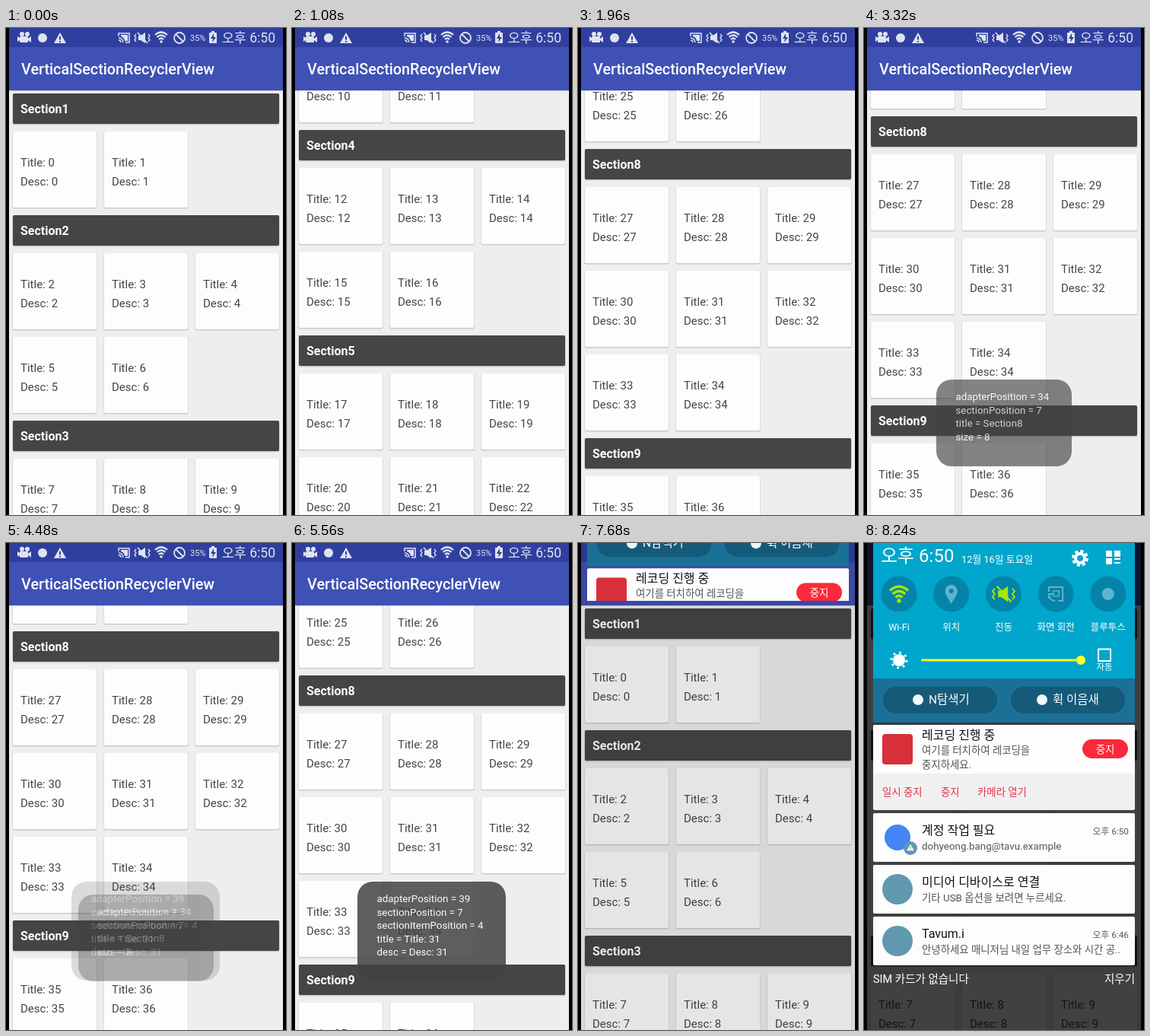
Animation of 368x640 px, one loop 8640 ms. Source, as an HTML page:

```html
<!DOCTYPE html>
<html lang="ko">
<head>
<meta charset="utf-8">
<title>VerticalSectionRecyclerView</title>
<style>
  html, body { margin: 0; height: 100%; overflow: hidden; background: #000; }
  svg { display: block; width: 100vw; height: 100vh; }
  text { font-family: Roboto, "Noto Sans CJK KR", "Noto Sans CJK", sans-serif; white-space: pre; }
</style>
</head>
<body>
<svg id="stage" viewBox="0 0 368 640"></svg>
<script>
const LOOP = 8640, STEP = 40;
const PAGE = '#eeeef0', DARK = '#454545', WHITE = '#fdfdfd', PALE = '#dfe3f0';
const STATUS = '#303f9f', PRIMARY = '#3f51b5';

const rect = (x, y, w, h, fill, r = 0) =>
  `<rect x="${x}" y="${y}" width="${w}" height="${h}" rx="${r}" fill="${fill}"/>`;
const disc = (x, y, r, fill) => `<circle cx="${x}" cy="${y}" r="${r}" fill="${fill}"/>`;
const ring = (x, y, r, color, width, dash = 'none') =>
  `<circle cx="${x}" cy="${y}" r="${r}" fill="none" stroke="${color}" stroke-width="${width}" stroke-dasharray="${dash}"/>`;
const line = (d, color, width = 1.5) =>
  `<path d="${d}" fill="none" stroke="${color}" stroke-width="${width}"/>`;
const shape = (d, fill) => `<path d="${d}" fill="${fill}" fill-rule="evenodd"/>`;
const text = (x, y, s, size, fill, anchor = 'start', weight = 400) =>
  `<text x="${x}" y="${y}" font-size="${size}" fill="${fill}" text-anchor="${anchor}" font-weight="${weight}">${s}</text>`;
const at = (x, y, body, scale = 1) => `<g transform="translate(${x} ${y}) scale(${scale})">${body}</g>`;
const group = (id, body) => `<g id="${id}">${body}</g>`;

// Icons are centred on 0,0
const wifi = c => line('M-8-3Q0-10 8-3M-5.5 0Q0-5 5.5 0M-3 3Q0 0 3 3', c, 2.2) + disc(0, 6, 1.8, c);
const vibrate = c => shape('M-5-3H-2L4-7V7L-2 3H-5Z', c) + line('M-6-7L7 7', c, 1.5) +
  line('M-8-5l-2 2.5 2 2.5-2 2.5 2 2.5M8-5l2 2.5-2 2.5 2 2.5-2 2.5', c, 1.3);
const warning = c => shape('M0-7L8 7H-8ZM-1-2V2.5H1V-2ZM-1 4V5.7H1V4Z', c);
const cast = c => line('M-7-2V-6H7V6H2M-7 0a6 6 0 0 1 6 6M-7 3a3 3 0 0 1 3 3', c) +
  shape('M-4-4H5V4H1Q0-1-4-2Z', c);
const camera = c => disc(-3, -4, 3, c) + disc(4, -4, 3, c) + rect(-6, -1, 11, 8, c, 1) +
  shape('M5 2L9-1V7L5 4ZM-9-1L-6 1V4L-9 6Z', c);

function card(x, y, w, h, fill) {
  return rect(x - .5, y, w + 1, h + 1.5, 'rgba(60,60,80,.2)', 2) + rect(x, y, w, h, fill, 2);
}

function listBody() {
  let y = 86, item = 0, out = '';
  [2, 5, 5, 5, 6, 2, 2, 8, 2, 5].forEach((size, i) => {
    out += card(9, y, 350, 40, DARK) + text(19, y + 26, 'Section' + (i + 1), 16, '#fff', 'start', 700);
    y += 50;
    for (let k = 0; k < size; k++, item++) {
      const x = 9 + k % 3 * 120, top = y + Math.floor(k / 3) * 110;
      out += card(x, top, 110, 100, WHITE) +
        text(x + 10, top + 46, 'Title: ' + item, 15, DARK) +
        text(x + 10, top + 71, 'Desc: ' + item, 15, DARK);
    }
    y += Math.ceil(size / 3) * 110;
  });
  return out;
}

function statusBar() {
  return rect(4, 0, 360, 25, STATUS) +
    at(24, 12, camera(PALE)) + disc(48, 13, 6, PALE) + at(71, 13, warning(PALE)) +
    at(155, 13, cast(PALE)) + at(179, 13, vibrate(PALE)) + at(204, 12, wifi(PALE)) +
    ring(228, 13, 7, PALE, 1.8) + line('M223 8L233 18', PALE, 1.8) + text(242, 17, '35%', 11, PALE) +
    rect(270, 4, 4, 3, PALE) + rect(267, 6, 10, 14, PALE, 1) + shape('M273 7L269 14H272L271 19L276 12H273Z', STATUS) +
    text(354, 19, '오후 6:50', 17.5, PALE, 'end');
}

function toast(x, y, w, h, lines) {
  return rect(x, y, w, h, 'rgba(66,66,66,.85)', 20) +
    lines.map((s, i) => text(x + 25.5, y + 27 + i * 17.5, s, 13.3, '#fafafa')).join('');
}

function quickSettings() {
  const on = '#a6e800', off = '#5fb4cc', yellow = '#ffff20';
  const toggles = [
    ['Wi-Fi', at(0, 0, wifi(on), 1.5)],
    ['위치', shape('M0 13C-5 4-8 1-8-4A8 8 0 0 1 8-4C8 1 5 4 0 13ZM-3-4a3 3 0 0 0 6 0a3 3 0 0 0-6 0Z', off)],
    ['진동', at(0, 0, vibrate(on), 1.45)],
    ['화면 회전', line('M-9-3V-9H9V9H3M-9 1a8 8 0 0 0 8 8M-9 6V0H-3', off, 2) + line('M-3-4H4V3H-3Z', off)],
    ['블루투스', disc(0, 0, 8, off)]
  ];
  return rect(12, 0, 344, 178, '#00a6cb') + rect(12, 178, 344, 58, '#1b7096') +
    text(22, 25, '오후 6:50', 24, '#fff') + text(128, 26, '12월 16일 토요일', 12.8, '#fff') +
    ring(284, 20, 9, '#fff', 4, '4 3.07') + ring(284, 20, 6, '#fff', 4) +
    rect(318, 10, 8, 8, '#fff') + rect(329, 10, 8, 8, '#fff') + rect(318, 20, 8, 8, '#fff') +
    line('M329 21H337M329 26H337', '#fff', 2) +
    toggles.map(([name, icon], i) => {
      const x = 46 + i * 68.7;
      return disc(x, 67, 23.5, '#0583a8') + at(x, 67, icon) + text(x, 115, name, 12.5, '#fff', 'middle');
    }).join('') +
    disc(46, 154, 8, '#fff') + ring(46, 154, 10, '#fff', 3, '2.6 5.254') +
    rect(75, 152.5, 210, 3, yellow, 1) + disc(285, 154, 6, yellow) +
    line('M308 139.5H324V155H308Z', '#fff', 2) + text(316, 167, '자동', 11.5, '#fff', 'middle') +
    rect(25, 189, 150, 35, '#165a7a', 17) + disc(71, 206, 7, '#f0f6fa') + text(85, 211, 'N탐색기', 15.5, '#fff') +
    rect(193, 189, 150, 35, '#165a7a', 17) + disc(234, 206, 7, '#f0f6fa') + text(248, 211, '휙 이음새', 15.5, '#fff');
}

function notice(y, icon, title, detail, time = '') {
  return rect(12, y, 344, 64, WHITE, 2) + icon + text(76, y + 28, title, 16, '#111') +
    text(76, y + 48, detail, 13.4, '#555') + text(348, y + 28, time, 11.8, '#555', 'end');
}

function notices() {
  const red = '#e8304c', slate = '#6098b0';
  return rect(12, 239, 344, 112, '#f0f0f2', 2) + rect(12, 239, 344, 64, WHITE, 2) +
    rect(24, 251, 40, 40, '#d8303a', 4) +
    text(76, 258, '레코딩 진행 중', 16, '#111') +
    text(76, 277, '여기를 터치하여 레코딩을', 13.4, '#555') + text(76, 296, '중지하세요.', 13.4, '#555') +
    rect(287, 258, 60, 25, '#fa2a3c', 12.5) + text(317, 275.5, '중지', 13.4, '#fff', 'middle') +
    text(24, 332, '일시 중지', 13.4, red) + text(101, 332, '중지', 13.4, red) + text(149, 332, '카메라 열기', 13.4, red) +
    notice(355, disc(44, 387, 17, '#4285f4') + disc(61, 401, 9, slate) + at(61, 400, warning('#fff'), .6),
      '계정 작업 필요', 'dohyeong.bang@tavu.example', '오후 6:50') +
    notice(423, disc(44, 455, 20, slate), '미디어 디바이스로 연결', '기타 USB 옵션을 보려면 누르세요.') +
    notice(491, disc(44, 523, 20, slate), 'Tavum.i',
      '안녕하세요 매니저님 내일 업무 장소와 시간 공..', '오후 6:46') +
    text(12, 578, 'SIM 카드가 없습니다', 14.5, '#fff') + text(356, 578, '지우기', 14.5, '#fff', 'end');
}

const stage = document.getElementById('stage');
stage.innerHTML = '<clipPath id="shade"><rect id="shadeBox" width="368"/></clipPath>' +
  rect(0, 0, 368, 640, '#000') + rect(4, 0, 360, 640, PAGE) +
  group('list', listBody()) +
  group('glow', shape('M4 0V45Q184 89 364 45V0Z', PRIMARY)) +
  rect(4, 82, 360, 1, 'rgba(0,0,0,.12)') + rect(4, 25, 360, 57, PRIMARY) +
  text(20, 61, 'VerticalSectionRecyclerView', 19.8, '#fff', 'start', 500) + statusBar() +
  group('sectionToast', toast(95, 462, 178, 114,
    ['adapterPosition = 34', 'sectionPosition = 7', 'title = Section8', 'size = 8'])) +
  group('itemToast', toast(86, 445, 195, 130,
    ['adapterPosition = 39', 'sectionPosition = 7', 'sectionItemPosition = 4', 'title = Title: 31', 'desc = Desc: 31'])) +
  group('dim', rect(0, 0, 368, 640, '#000')) +
  `<g clip-path="url(#shade)">${group('panel', quickSettings() + notices())}</g>`;

const $ = id => document.getElementById(id);
const ramp = (t, from, to) => Math.min(1, Math.max(0, (t - from) / (to - from)));
const easeOut = (p, power = 2) => 1 - (1 - p) ** power;
const move = (id, value) => $(id).setAttribute('transform', value);
const fade = (id, value) => $(id).setAttribute('opacity', value);

// Two flings down, then one drag and fling back to the top
function scrollAt(t) {
  const fling = (from, to) => easeOut(ramp(t, from, to), 2.36);
  const back = 58 * ramp(t, 5520, 5560) + 1472 * easeOut(ramp(t, 5560, 5920), 1.3);
  return 510 * fling(0, 1000) + 1020 * fling(1000, 2300) - back;
}

function draw(now) {
  const t = Math.floor(now % LOOP / STEP) * STEP;
  move('list', `translate(0 ${-Math.round(scrollAt(t))})`);

  const glow = easeOut(ramp(t, 5880, 6000)) * (1 - ramp(t, 6120, 6700)) ** 1.7;
  move('glow', `translate(0 81) scale(1 ${glow})`);
  fade('glow', .42 * Math.sqrt(glow));

  fade('sectionToast', easeOut(ramp(t, 3120, 3640), 3) * (1 - ramp(t, 4160, 4560) ** 2));
  fade('itemToast', easeOut(ramp(t, 4440, 4960), 3) * (1 - ramp(t, 5560, 5960)));

  // The shade's lower edge follows the finger while its header slides in
  const pull = easeOut(ramp(t, 7640, 8240));
  move('panel', `translate(0 ${-236 * (1 - pull)})`);
  $('shadeBox').setAttribute('height', 590 * pull);
  fade('dim', .74 * pull);
}

const start = performance.now();
function tick() {
  draw(performance.now() - start);
  requestAnimationFrame(tick);
}
tick();
</script>
</body>
</html>
```
